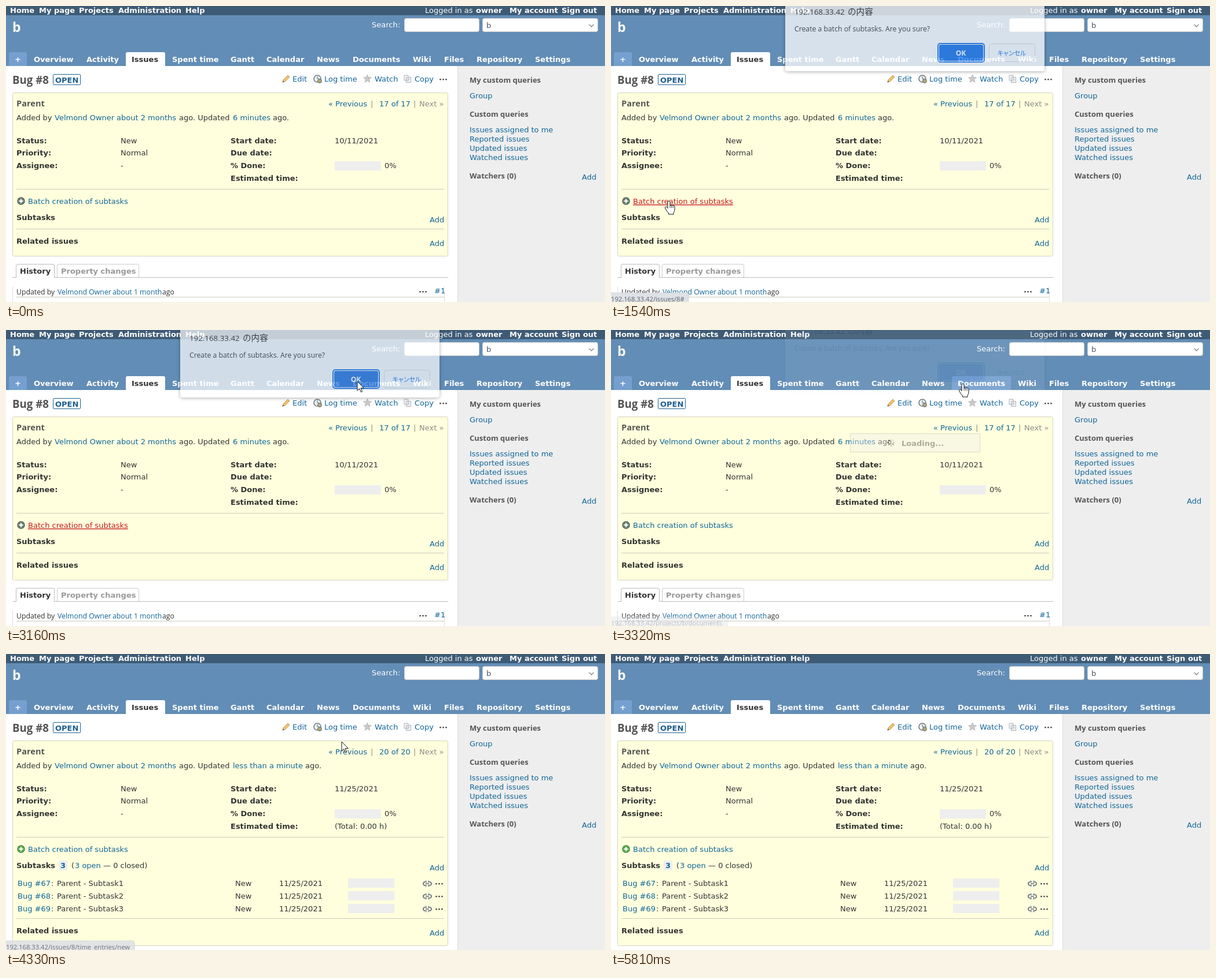
Write an HTML page that moves like this. It is 1035 by 513 pixels and loops after 6.65 s.

```html
<!DOCTYPE html>
<html lang="en">
<head>
<meta charset="utf-8">
<title>Batch creation of subtasks</title>
<style>
html, body { margin: 0; width: 100%; height: 100%; overflow: hidden; background: #fff; }
svg { display: block; width: 1035px; height: 513px; }
text { font: 13px "DejaVu Sans", sans-serif; fill: #333; white-space: pre; }
.b { font-weight: 700; }
.w { fill: #fff; }
.l { fill: #116699; }
.g { fill: #8c8c88; }
.h { font: 700 13px "Open Sans", sans-serif; fill: #555; }
.o { font-family: "Open Sans", sans-serif; }
.hover { fill: #c61a1a; text-decoration: underline; }
.hr { stroke: #cbcbbf; }
#box { filter: drop-shadow(0 1px 3px rgba(0,0,0,.45)); }
</style>
</head>
<body>
<svg id="stage" viewBox="0 0 1035 513" xmlns="http://www.w3.org/2000/svg"></svg>
<script>
const LOOP = 6650;
const T = (x, y, s, c = "", more = "") => `<text x="${x}" y="${y}" class="${c}" ${more}>${s}</text>`;
const R = (x, y, w, h, fill, more = "") => `<rect x="${x}" y="${y}" width="${w}" height="${h}" fill="${fill}" ${more}/>`;
const hr = (y, x1 = 18, x2 = 757) => `<path class="hr" d="M${x1} ${y}H${x2}"/>`;
const dots = (x, y) => [0, 5, 10].map(d => R(x + d, y - 1, 3, 2.4, "#555", 'rx="1"')).join("");
const row = (y, c, items) => items.map(([x, s]) => T(x, y, s, c)).join("");
const open = id => `<g id="${id}">`;

const header = R(0, 0, 1035, 16, "#3e5b76") + R(0, 16, 1035, 88, "#628db6") +
  row(12, "b w", [[7, "Home"], [57, "My page"], [126, "Projects"], [194, "Administration"], [310, "Help"],
    [812, "owner"], [870, "My account"], [960, "Sign out"]]) +
  T(724, 12, "Logged in as", "w") +
  T(11, 45, "b", "h w", 'style="font-size:23px;fill:#f8f8f8"') +
  T(632, 37, "Search:", "w") +
  R(688.5, 21.5, 129, 23, "#fff", 'rx="3" stroke="#ccc"') +
  R(823.5, 21.5, 199, 23, "#fff", 'rx="3" stroke="#ccc"') +
  T(830, 38, "b", "", 'style="fill:#456"') +
  '<path d="M1007.5 32l4 4 4-4" fill="none" stroke="#888" stroke-width="1.4"/>' +
  '<path d="M5 104V83q0-3 3-3h25q3 0 3 3v21z" fill="#759fcf"/>' +
  '<path d="M207 104V83q0-3 3-3h62q3 0 3 3v21z" fill="#fff"/>' +
  '<path id="docs" d="M589 104V83q0-3 3-3h96q3 0 3 3v21z" fill="#759fcf"/>' +
  row(97, "b w", [[15, "+"], [48, "Overview"], [139, "Activity"], [287, "Spent time"], [388, "Gantt"],
    [450, "Calendar"], [537, "News"], [599, "Documents"], [703, "Wiki"], [757, "Files"],
    [813, "Repository"], [914, "Settings"]]) +
  T(217, 97, "Issues", "b");

const sidebar = R(780, 104, 255, 409, "#eeeeee") + R(780, 104, 1, 409, "#dddddd") +
  T(801, 133, "My custom queries", "h") + T(801, 192, "Custom queries", "h") + T(801, 299, "Watchers (0)", "h") +
  T(801, 160, "Group", "l") +
  ["Issues assigned to me", "Reported issues", "Updated issues", "Watched issues"]
    .map((s, i) => T(801, 219 + 16 * i, s, "l")).join("") +
  T(995, 301, "Add", "l");

const icons =
  '<path d="M478 132l1-4 8-8 3 3-8 8z" fill="#f0c070" stroke="#b98a4a" stroke-width=".8"/><path d="M477.5 132.5l1-3 2 2z" fill="#555"/>' +
  '<circle cx="538" cy="126" r="6" fill="#eef3f5" stroke="#6d7880" stroke-width="1.6"/><path d="M538 122v4h3" stroke="#567" fill="none"/>' +
  '<circle cx="542" cy="130" r="3.4" fill="#b9a878" stroke="#5c6468"/>' +
  '<path d="M624.5 119l2 4.6 5 .4-3.800 3.300 1.200 4.900-4.400-2.700-4.400 2.700 1.200-4.900-3.800-3.300 5-.4z" fill="#c9c9c9" stroke="#aaa" stroke-width=".7"/>' +
  '<path d="M688 120h7v9h-7zM691.500 123.500h8v9h-8z" fill="#f6f6f6" stroke="#a9b0b8"/><path d="M693 126h5m-5 2h5m-5 2h3" stroke="#bcc4cc" stroke-width=".8"/>';

const title = T(11, 135, "Bug #8", "h", 'style="font-size:18.7px"') +
  R(81.5, 118.5, 47, 18, "#fff", 'stroke="#1d5f8f" rx="1"') +
  T(85, 133, "OPEN", "b", 'style="fill:#1d5f8f"') + icons +
  T(495, 131, "Edit", "l") + T(550, 131, "Log time", "l", 'id="log"') +
  T(637, 131, "Watch", "l") + T(706, 131, "Copy", "l") + dots(749, 127);

const panel = R(11.5, 150.5, 752, 283, "#ffffdd", 'id="panel" stroke="#d4d4c4" rx="2"') +
  T(18, 174, "Parent", "h", 'style="font-size:14.6px"') +
  T(557, 174, "« Previous", "l") + T(630, 174, "|", "g") + T(704, 174, "|", "g") + T(714, 174, "Next »", "g") +
  T(18, 198, "Added by") + T(84, 198, "Velmond Owner", "l") + T(191, 198, "about 2 months", "l") + T(299, 198, "ago. Updated") +
  T(18, 238, "Status:", "b") + T(18, 259, "Priority:", "b") + T(18, 281, "Assignee:", "b") +
  T(198, 238, "New") + T(198, 259, "Normal") + T(198, 281, "-") +
  T(388, 238, "Start date:", "b") + T(388, 259, "Due date:", "b") + T(388, 281, "% Done:", "b") + T(388, 303, "Estimated time:", "b") +
  R(568, 269, 80, 16, "#eee") + T(654, 281, "0%") + hr(317.5) +
  '<circle id="plus" cx="26" cy="338" r="6" stroke-width="1.500"/><path d="M26 334.500v7m-3.500-3.500h7" stroke="#fff" stroke-width="2"/>' +
  T(38, 343, "Batch creation of subtasks", "l", 'id="batch"') +
  T(18, 371, "Subtasks", "b") + T(732, 375, "Add", "l");

const before = open("before") +
  T(645, 174, "17 of 17", "l") + T(392, 198, "6 minutes", "l") + T(461, 198, "ago.") + T(568, 238, "10/11/2021") +
  hr(386.5) + T(18, 412, "Related issues", "b") + T(732, 416, "Add", "l") +
  '<path d="M11 470.500H764" stroke="#bbb"/>' +
  '<path d="M17.500 471V450q0-2.500 2.500-2.500h61q2.500 0 2.500 2.500v21" fill="#fff" stroke="#bbb"/>' +
  '<path d="M88.500 470V450q0-2.500 2.500-2.500h136q2.500 0 2.500 2.500v20" fill="#fff" stroke="#ccc"/>' +
  T(24, 464, "History", "b") + T(95, 464, "Property changes", "b", 'style="fill:#999"') +
  '<path d="M11.500 486V513M757.500 486V513" stroke="#ddd"/>' + hr(504.5) +
  [[18, "Updated by"], [89, "Velmond Owner", "l"], [184, "about 1 month", "l"], [270, "ago"]]
    .map(([x, s, c = ""]) => T(x, 500, s, "o " + c, 'style="font-size:12.3px"')).join("") +
  dots(714, 495) + T(740, 498, "#1", "l") + "</g>";

const chain = (x, y) => `<g transform="translate(${x} ${y})" fill="none"><path d="M-1 -3h-3a3 3 0 0 0 0 6h3M1 -3h3a3 3 0 0 1 0 6h-3M-3 0h6" stroke="#667" stroke-width="1.600"/><path d="M-3-6l1 2M3-6l-1 2M-3 6l1-2M3 6l-1-2" stroke="#4a93cc"/></g>`;
const subtask = i => {
  const y = 402 + 22 * i;
  return T(20, y, "Bug #" + (67 + i), "l") + T(78, y, ":") + T(88, y, "Parent - Subtask" + (i + 1)) +
    T(396, y, "New") + T(472, y, "11/25/2021") + R(591, y - 13, 80, 16, "#eee") +
    chain(728, y - 4) + dots(742, y - 4);
};
const after = open("after") +
  T(645, 174, "20 of 20", "l") + T(392, 198, "less than a minute", "l") + T(517, 198, "ago.") +
  T(568, 238, "11/25/2021") + T(568, 303, "(Total: 0.00 h)") +
  R(91, 358, 15, 17, "#eeeeee", 'rx="2"') + T(94, 371, "3", "b l") +
  T(113, 371, "(") + T(119, 371, "3 open", "l") + T(168, 371, "— 0 closed)") +
  [0, 1, 2].map(subtask).join("") + hr(458.5) +
  T(18, 484, "Related issues", "b") + T(732, 488, "Add", "l") + "</g>";

const spokes = [...Array(8)].map((_, i) =>
  `<path d="M0-3V-7" stroke="#111" stroke-width="1.800" opacity="${(i + 2) / 9}" transform="rotate(${45 * i})"/>`).join("");
const loading = '<g id="loading" opacity=".4">' + R(413.5, 179.5, 224, 32, "#eee", 'stroke="#aaa"') +
  `<g id="spin">${spokes}</g>` + T(502, 201, "Loading...", "b") + "</g>";

const dialog = open("dialog") + R(301, -40, 448, 163, "#fff", 'id="box" rx="4"') +
  T(317, 25, "192.168.33.42", "o", 'style="font-size:13.3px"') +
  T(409, 25, "の内容", "", `style="font:14.6px 'Noto Sans CJK JP','Noto Sans CJK',sans-serif"`) +
  T(317, 54, "Create a batch of subtasks. Are you sure?", "o", 'style="font-size:12.25px"') +
  R(565, 75, 80, 32, "#fff", 'rx="4" stroke="#1a73e8" stroke-width="2"') +
  R(567, 77, 76, 28, "#1a73e8", 'id="ok" rx="3"') +
  T(604.5, 95.5, "OK", "o b w", 'text-anchor="middle" style="font-size:12px"') +
  R(653.5, 75.5, 79, 31, "#fff", 'rx="4" stroke="#dadce0"') +
  T(692.5, 95.5, "キャンセル", "", `text-anchor="middle" style="font:500 11px 'Noto Sans CJK JP','Noto Sans CJK',sans-serif;font-feature-settings:'palt';fill:#1a73e8"`) + "</g>";

const bubble = open("bubble") + '<path id="bubbleBg" fill="#dee1e6" stroke="#c8ccd0" stroke-width=".6"/>' +
  T(0, 512, "", "o", 'id="address" style="font-size:11.2px;fill:#5f6368"') + "</g>";

const pointer = '<path id="arrow" d="M0 0V16l3.700-3.500 2.600 6 2.300-1-2.500-5.800H11.300Z" fill="#fff" stroke="#111"/>' +
  '<g id="hand"><path d="M-2 2a2 2 0 0 1 4 0v6q1-1.400 2.600-.4 1-1 2.600 .2 1.400-.8 2.800 1V14q0 4-2 6.500V23H-.5V21Q-4 18-6 13q-1.400-3 .6-3.400 1.600 0 3.400 2.900Z" fill="#fff" stroke="#111" stroke-linejoin="round"/><path d="M2 8v4M4.600 8v4M7.200 8.500v3.500" stroke="#111" stroke-width=".8"/></g>';

const $ = id => document.getElementById(id);
$("stage").innerHTML = R(0, 0, 1035, 513, "#fff") + header + sidebar + title + panel + before + after +
  loading + dialog + bubble + pointer;

// Pointer moves: start, ms per step, points
const moves = [
  [0, 74, [[700, 540]]],
  [300, 74, [[666, 487], [500, 450], [330, 405], [200, 362], [120, 338], [100, 322]]],
  [850, 70, [[99, 326], [98, 333], [98, 337]]],
  [1235, 75, [[99, 338], [100, 338]]],
  [1850, 76, [[125, 328], [190, 300], [290, 255], [400, 210], [500, 165], [575, 135], [608, 117], [610, 100], [607, 88]]],
  [3010, 77.5, [[607, 88], [607, 89], [607, 91], [608, 92], [608, 93]]],
  [4178, 76, [[606, 100], [592, 128], [580, 152], [520, 200], [420, 255], [320, 305], [235, 340], [145, 358], [75, 365]]],
  [4880, 77.5, [[34, 374], [20, 402], [40, 440], [98, 464], [170, 452], [200, 414], [178, 386], [145, 405], [140, 440]]],
  [5580, 76.6, [[230, 460], [380, 485], [534, 500], [700, 540]]]
];
const pages = [["192.168.33.42/issues/8#", 134], ["192.168.33.42/projects/b/documents", 202],
  ["192.168.33.42/issues/8/time_entries/new", 222]];
// time, page, opacity
const hints = [[0, 0, 0], [1160, 0, .4], [1235, 0, .75], [1310, 0, 1], [2458, 0, .65], [2550, 0, .3], [2630, 0, 0],
  [3242, 1, .15], [3320, 1, .4], [3397, 1, .75], [3475, 1, 1], [4254, 2, 1], [4330, 2, .9], [4406, 2, .4], [4482, 2, 0]];
// time, opacity, offset
const fades = [[0, 0, 0], [1450, .25, -18], [1533, .74, -10], [1617, .95, -3], [1700, 1, 0],
  [3010, .92, -2], [3087, .7, -6], [3165, .45, -10], [3242, .22, -14], [3320, .07, -18], [3397, 0, 0]];

const last = (list, t) => list.filter(k => k[0] <= t).pop();
const show = (id, on) => $(id).style.display = on ? "" : "none";
const within = (t, a, b) => t >= a && t < b;

function draw(t) {
  const [start, step, pts] = last(moves, t);
  const [x, y] = pts[Math.min(pts.length - 1, Math.floor((t - start) / step + 1e-6))];
  const onBatch = t < 1850 && within(x, 38, 211) && within(y, 331, 347);
  const batch = onBatch || within(t, 1850, 3242);
  const docs = within(t, 3242, 4178) && !within(t, 3940, 4020);
  const log = within(t, 4254, 4330);
  const hand = onBatch || docs || log;
  const done = t >= 3940;

  $("batch").setAttribute("class", batch ? "hover" : "l");
  $("log").setAttribute("class", log ? "hover" : "l");
  show("docs", docs);
  show("before", !done);
  show("after", done);
  $("panel").setAttribute("height", done ? 355 : 283);
  $("plus").setAttribute("fill", done ? "#62b158" : "#728678");
  $("plus").setAttribute("stroke", done ? "#46883f" : "#59665f");

  show("loading", within(t, 3242, 3940));
  const turn = Math.floor((Math.min(t, 3552) - 3320) / 77.5 + 1e-6);
  $("spin").setAttribute("transform", `translate(484 195) rotate(${45 * turn})`);

  const [, alpha, dy] = last(fades, t);
  show("dialog", alpha > 0);
  $("dialog").setAttribute("opacity", alpha);
  $("dialog").setAttribute("transform", `translate(0 ${dy})`);
  $("ok").setAttribute("fill", t >= 2550 ? "#2672de" : "#1a73e8");

  const [, page, seen] = last(hints, t);
  const [url, w] = pages[page];
  show("bubble", seen > 0);
  $("bubble").setAttribute("opacity", seen);
  $("address").textContent = url;
  $("bubbleBg").setAttribute("d", `M-1 514V497H${w - 4}q4 0 4 4v13z`);

  show("arrow", !hand);
  show("hand", hand);
  $(hand ? "hand" : "arrow").setAttribute("transform", `translate(${x} ${y})`);
}

const origin = performance.now();
function tick() {
  draw((performance.now() - origin) % LOOP);
  requestAnimationFrame(tick);
}
tick();
</script>
</body>
</html>
```
